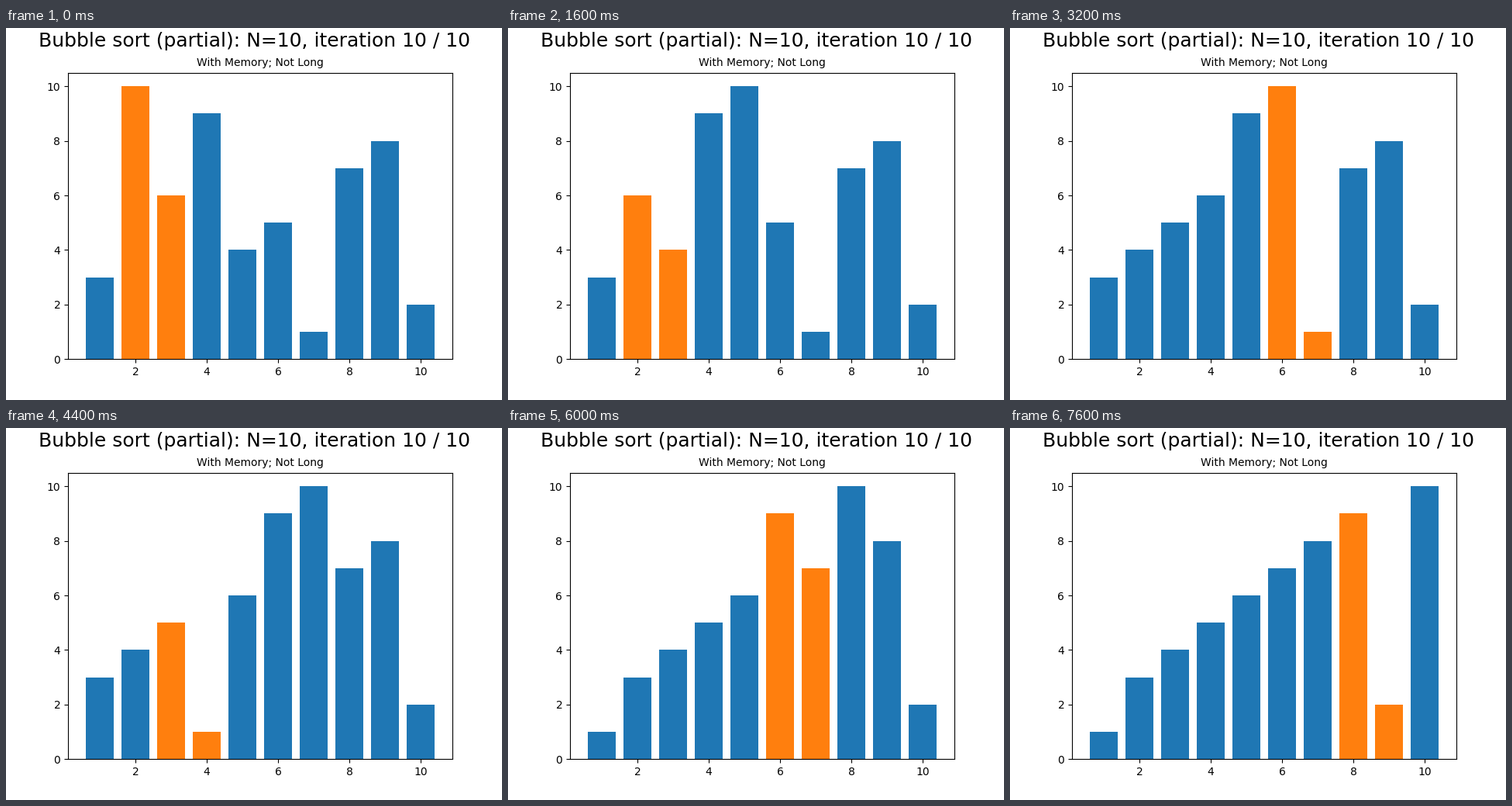
These frames come from a looping animation (640x480 px, 8000 ms). A matplotlib script:

```python
import matplotlib.pyplot as plt
from matplotlib.animation import FuncAnimation

START = [3, 10, 6, 9, 4, 5, 1, 7, 8, 2]
STEPS = 20
STEP_MS = 400


def swap_states(values, count):
    """List (values, left index) just before each adjacent swap of the sort."""
    values = list(values)
    states = []
    for end in range(1, len(values)):
        i = end
        while i > 0 and values[i - 1] > values[i]:
            states.append((values[:], i - 1))
            values[i - 1], values[i] = values[i], values[i - 1]
            i -= 1
    return states[:count]


states = swap_states(START, STEPS)

plt.rcParams["font.family"] = "DejaVu Sans"
fig, ax = plt.subplots(figsize=(6.4, 4.8), dpi=100)
fig.suptitle("Bubble sort (partial): N=10, iteration 10 / 10", fontsize=18, y=0.99)
ax.set_title("With Memory; Not Long", fontsize=10)
bars = ax.bar(range(1, len(START) + 1), START, color="tab:blue")
ax.set_xlim(0.11, 10.89)
ax.set_ylim(0, 10.5)


def update(step):
    values, left = states[step]
    for i, (bar, value) in enumerate(zip(bars, values)):
        bar.set_height(value)
        bar.set_color("tab:orange" if i in (left, left + 1) else "tab:blue")
    return list(bars)


# Bars start without an edge line; set_color must not add one.
for bar in bars:
    bar.set_linewidth(0)

anim = FuncAnimation(fig, update, frames=STEPS, interval=STEP_MS,
                     repeat=True, repeat_delay=0)
plt.show()
```
